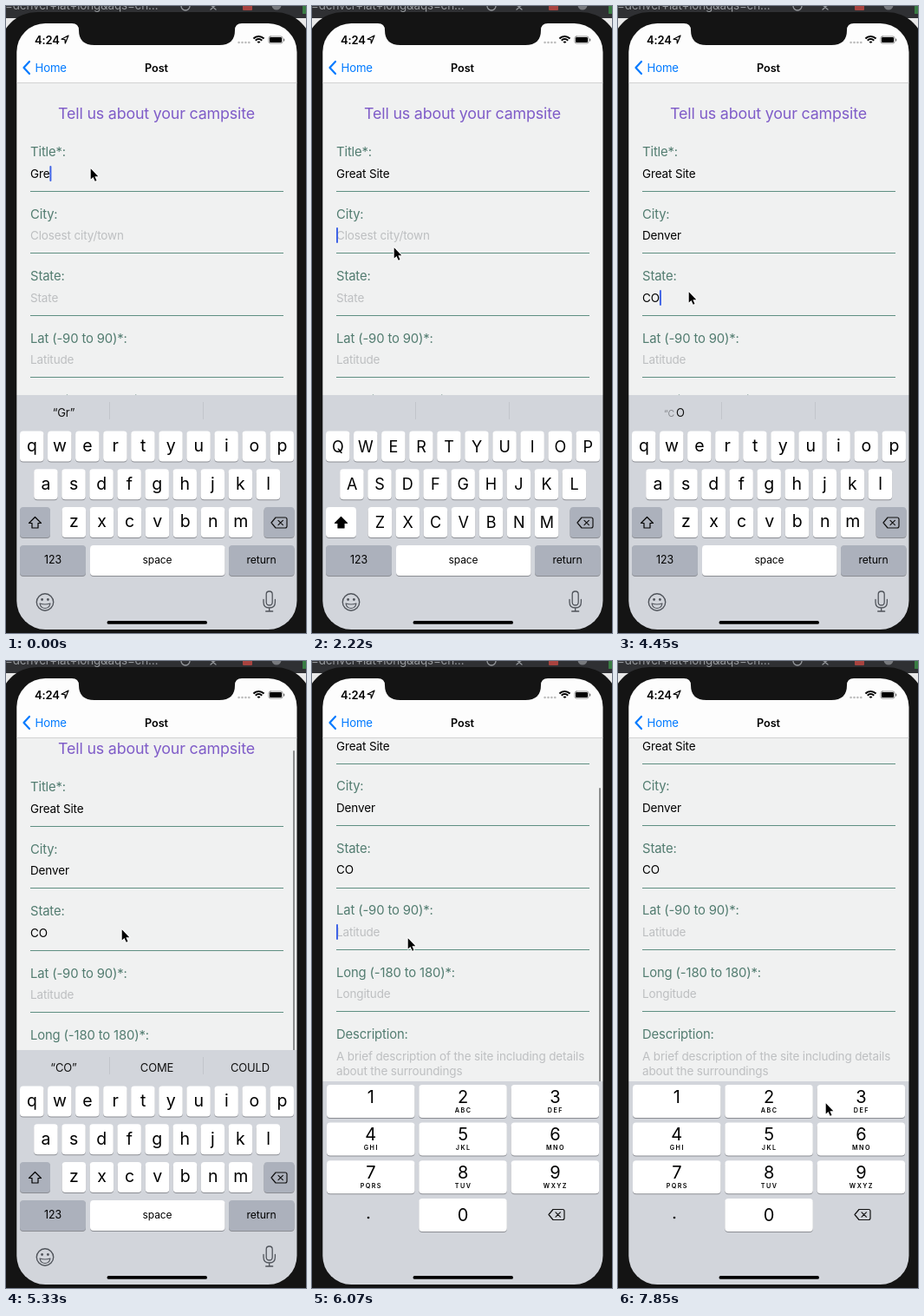
Write an HTML page with a canvas that moves like this. It is 346 by 722 pixels and loops after 8 s.

```html
<!DOCTYPE html>
<html lang="en">
<head>
<meta charset="utf-8">
<title>Campsite form</title>
<style>
html, body { margin: 0; width: 100%; height: 100%; overflow: hidden; background: #141414; }
canvas { display: block; width: 346px; height: 722px; }
</style>
</head>
<body>
<canvas id="stage"></canvas>
<script>
const W = 346, H = 722, LOOP = 8000, TICKS = 54, STEP = LOOP / TICKS;
const canvas = document.getElementById('stage');
const c = canvas.getContext('2d');
const dpr = window.devicePixelRatio || 1;
canvas.width = W * dpr;
canvas.height = H * dpr;

const ROW = 71.4, KEYBOARD = '#d2d5db', GREY_KEY = '#acb1bc', BODY = '#141414';
const FIELDS = [
  ['Title*:', ''], ['City:', 'Closest city/town'], ['State:', 'State'],
  ['Lat (-90 to 90)*:', 'Latitude'], ['Long (-180 to 180)*:', 'Longitude'], ['Description:', '']
];

// Timelines: [tick, value...]
const TITLE = [[0, 'Gre'], [1, 'Grea'], [2, 'Great'], [4, 'Great '], [5, 'Great S'], [6, 'Great Si'], [7, 'Great Sit'], [8, 'Great Site']];
const HINTS = [
  [0, '“Gr”'], [1, '“Gre”'], [2, '“Grea”'], [3, '“Great”'], [4], [5, '“S”'], [6, '“Si”'], [7, '“Sit”'], [8, '“Site”'],
  [14], [19, '“D”'], [20, '“De”'], [21, '“Den”'], [22, '“Denv”'], [23, '“Denve”'], [24, '“Denver”'],
  [27], [31, '“CO”', 'COME', 'COULD']
];
const SHIFT = [[0, false], [14, true], [19, false], [27, true], [30, false]];
const SCROLL = [[0, 0], [36, 23], [37, 95.3]];
const FOCUS = [[0, 0], [14, 1], [27, 2], [39, 3]];
const CARET = [[0, 1], [35, 0], [39, 1], [45, 0.4], [46, 0], [48, 1], [53, 0]];
const POINTER = [
  [0, 97, 186], [8, 97, 186], [13, 94, 277], [25, 94, 277], [27, 81, 328], [31, 81, 328], [34, 130, 331],
  [35, 133, 331], [36, 133, 308], [37, 133, 236], [40, 110, 318], [47, 110, 318], [51, 226, 526], [53, 239, 508]
];

const entry = (line, n) => line.filter(k => k[0] <= n).pop();
const at = (line, n) => entry(line, n)[1];

function pointerAt(n) {
  const a = entry(POINTER, n), b = POINTER.find(k => k[0] > n) || a;
  const f = a === b ? 0 : (n - a[0]) / (b[0] - a[0]);
  return [a[1] + (b[1] - a[1]) * f, a[2] + (b[2] - a[2]) * f];
}

// y is the middle of the capitals
function text(s, x, y, size, color, align = 'left', weight = 400, spacing = -0.01) {
  c.font = `${weight} ${size}px Inter, "Liberation Sans", sans-serif`;
  c.letterSpacing = size * spacing + 'px';
  c.textAlign = align;
  c.fillStyle = color;
  c.fillText(s, x, y + size * 0.36);
}

function box(x, y, w, h, r, color) {
  c.beginPath();
  c.roundRect(x, y, w, h, r);
  c.fillStyle = color;
  c.fill();
}

function disc(x, y, r, color) {
  c.beginPath();
  c.arc(x, y, r, 0, 7);
  c.fillStyle = color;
  c.fill();
}

function shape(d, x, y, fill, stroke, width = 1) {
  const p = new Path2D(d);
  c.save();
  c.translate(x, y);
  if (stroke) {
    c.strokeStyle = stroke;
    c.lineWidth = width;
    c.lineJoin = c.lineCap = 'round';
    c.stroke(p);
  }
  if (fill) {
    c.fillStyle = fill;
    c.fill(p);
  }
  c.restore();
}

function key(x, y, w, h, color = '#fff') {
  box(x, y + 1, w, h, 4, '#8b8d93');
  box(x, y, w, h, 4, color);
}

const deleteIcon = (x, y) =>
  shape('M-9 0L-4 -6H7Q9 -6 9 -4V4Q9 6 7 6H-4ZM-1 -2.7L4.4 2.7M4.4 -2.7L-1 2.7', x, y, null, '#111', 1.2);

function desktop() {
  c.fillStyle = '#e9e9e9';
  c.fillRect(0, 0, W, H);
  c.fillStyle = '#2f3033';
  c.fillRect(0, 0, W, 14);
  text('=denver+lat+long&aqs=ch…', -1, -0.5, 13.4, '#96999d');
  c.strokeStyle = '#96999d';
  c.lineWidth = 1.3;
  c.beginPath();
  c.arc(207, 0, 5, 0, 7);
  c.stroke();
  shape('M-5 -2L0 1L5 -2M-3 4L0 1.5L3 4', 239, 0, null, '#96999d', 1.2);
  box(273, -6, 11, 11, 1, '#a8433f');
  disc(312, -1, 5.5, '#77797d');
  box(342, 0, 4, 9, 0, '#3a7d44');
  box(-8, 7, 362, 760, 44, BODY);
}

function header() {
  box(12, 20, 324, 68, 0, '#fdfdfd');
  box(12, 88, 324, 0.7, 0, '#c8c8ca');
  shape('M76 20Q84 20 84 28Q84 45 102 45H246Q264 45 264 28Q264 20 272 20Z', 0, 0, BODY);
  text('4:24', 33, 39, 13, '#000', 'left', 600);
  shape('M72 34L64 38.2L68 38.6L68.3 43Z', 0, 0, null, '#000', 1.2);
  for (let i = 0; i < 4; i++) disc(268.6 + i * 3.9, 42, 1.3, '#bcbcbc');
  c.strokeStyle = '#000';
  c.lineWidth = 2;
  c.lineCap = 'butt';
  for (const r of [8.3, 5.1, 1.6]) {
    c.beginPath();
    c.arc(291.5, 43.2, r, -Math.PI * 0.76, -Math.PI * 0.24);
    c.stroke();
  }
  shape('M305 35H317Q319 35 319 37V41Q319 43 317 43H305Q303 43 303 41V37Q303 35 305 35Z', 0, 0, null, '#777', 0.8);
  box(304, 36, 14, 6, 1.2, '#000');
  box(320, 37.5, 1.3, 3, 0.6, '#777');
  shape('M27 64L20.5 71L27 78', 0, 0, null, '#007aff', 2.2);
  text('Home', 33.5, 71, 13.2, '#007aff');
  text('Post', 173.5, 71, 12.7, '#000', 'center', 600);
}

function form(n, bottom) {
  const s = at(SCROLL, n);
  const typed = [
    at(TITLE, n),
    'Denver'.slice(0, Math.max(0, n - 17)),
    n >= 30 ? 'CO' : '', '', '', ''
  ];
  c.save();
  c.beginPath();
  c.rect(12, 88, 324, bottom - 88);
  c.clip();
  box(12, 88, 324, 420, 0, '#f0f1f1');
  text('Tell us about your campsite', 173.5, 123.5 - s, 17.85, '#7f5cc8', 'center');
  FIELDS.forEach(([label, hint], i) => {
    const y = 168 + i * ROW - s;
    text(label, 28, y, 14.85, '#527c70');
    text(typed[i] || hint, 28, y + 25, 13.5, typed[i] ? '#000' : '#bdbfc1');
    if (i < 5) box(28, Math.round(y + 45), 292, 1, 0, '#5f8f82');
  });
  text('A brief description of the site including details', 28, 550.5 - s, 13.5, '#bdbfc1');
  text('about the surroundings', 28, 567 - s, 13.5, '#bdbfc1');

  const i = at(FOCUS, n);
  c.globalAlpha = at(CARET, n);
  box(28 + c.measureText(typed[i]).width, Math.round(184 + i * ROW - s), 2, 18, 1, '#3f63e6');
  c.globalAlpha = 1;
  if (n >= 36 && n < 49) box(331, 89.3 + s * 0.595, 2, 500, 1, '#8c8e8e');
  c.restore();
}

function letters(n) {
  const upper = at(SHIFT, n);
  box(12, 448, 324, 280, 0, KEYBOARD);
  box(119, 456, 1, 20, 0, '#c2c5cb');
  box(227, 456, 1, 20, 0, '#c2c5cb');
  if (n === 30) {
    text('“C', 53, 469, 10.5, '#85878c');
    text('O', 67, 468, 13, '#111');
  } else {
    entry(HINTS, n).slice(1).forEach((w, i) => text(w, 66.5 + i * 107.5, 468, 13, '#111', 'center'));
  }
  [['qwertyuiop', 16], ['asdfghjkl', 32.2], ['zxcvbnm', 64.6]].forEach(([row, x0], r) => {
    const y = 489.5 + r * 43.7;
    [...row].forEach((ch, i) => {
      const x = x0 + i * 32.05;
      key(x, y, 27.5, 35);
      if (upper) text(ch.toUpperCase(), x + 13.8, y + 17.7, 18, '#000', 'center');
      else text(ch, x + 13.8, y + 16.3, 19.5, '#000', 'center');
    });
  });
  key(16, 577, 35, 35, upper ? '#fff' : GREY_KEY);
  shape('M0 -6.5L7 0.5H3.5V6H-3.5V0.5H-7Z', 33.5, 595, upper ? '#000' : null, '#000', 1.2);
  key(297.5, 577, 35, 35, GREY_KEY);
  deleteIcon(315, 595);
  key(16, 621, 76, 35, GREY_KEY);
  key(97, 621, 155.5, 35);
  key(257, 621, 75.5, 35, GREY_KEY);
  text('123', 54, 638, 12.4, '#000', 'center');
  text('space', 174.5, 637.5, 12, '#000', 'center');
  text('return', 294.5, 637.5, 12.2, '#000', 'center');

  const ink = '#50545b';
  shape('M-9.7 0A9.7 9.7 0 1 0 9.7 0A9.7 9.7 0 1 0 -9.7 0', 45, 686.5, null, ink, 1.4);
  disc(41.6, 683.5, 1.4, ink);
  disc(48.4, 683.5, 1.4, ink);
  shape('M-6 1.5Q0 3.5 6 1.5Q5 7 0 7Q-5 7 -6 1.5Z', 45, 686.5, null, ink, 1.2);
  shape('M-3.5 -8Q-3.5 -11.5 0 -11.5T3.5 -8V1Q3.5 4.5 0 4.5T-3.5 1ZM-6.7 -2V1Q-6.7 7.5 0 7.5T6.7 1V-2M0 7.5V11.5M-4 11.5H4',
    303.7, 685.5, null, ink, 1.3);
}

function digits() {
  const subs = ['', 'ABC', 'DEF', 'GHI', 'JKL', 'MNO', 'PQRS', 'TUV', 'WXYZ'];
  box(12, 484, 324, 240, 0, KEYBOARD);
  subs.forEach((sub, i) => {
    const x = 17 + (i % 3) * 106.3, y = 488 + Math.floor(i / 3) * 43.6;
    key(x, y, 101.5, 38);
    text(i + 1, x + 50.7, y + 13.5, 20, '#000', 'center');
    text(sub, x + 51.3, y + 29.3, 7.2, '#000', 'center', 600, 0.2);
  });
  key(123.3, 619, 101.5, 38);
  text('0', 174, 637.5, 20, '#000', 'center');
  disc(65, 641, 1.3, '#000');
  deleteIcon(282, 637.5);
}

function draw(n) {
  const numeric = n >= 40;
  c.setTransform(dpr, 0, 0, dpr, 0, 0);
  desktop();
  c.save();
  c.beginPath();
  c.roundRect(12.3, 20, 323.2, 698, 33);
  c.clip();
  form(n, numeric ? 484 : 448);
  header();
  if (numeric) digits();
  else letters(n);
  box(116.5, 708, 115.5, 3.8, 1.9, '#000');
  c.restore();
  shape('M0.7 1.3V13.5L3.5 10.9L5.7 15.8L7.5 15L5.4 10.2H9.3Z', ...pointerAt(n), '#000', '#fff', 2);
}

const start = performance.now();
function loop() {
  const t = (performance.now() - start) % LOOP;
  draw(Math.floor((t + 6) / STEP) % TICKS);
  requestAnimationFrame(loop);
}
loop();
</script>
</body>
</html>
```
